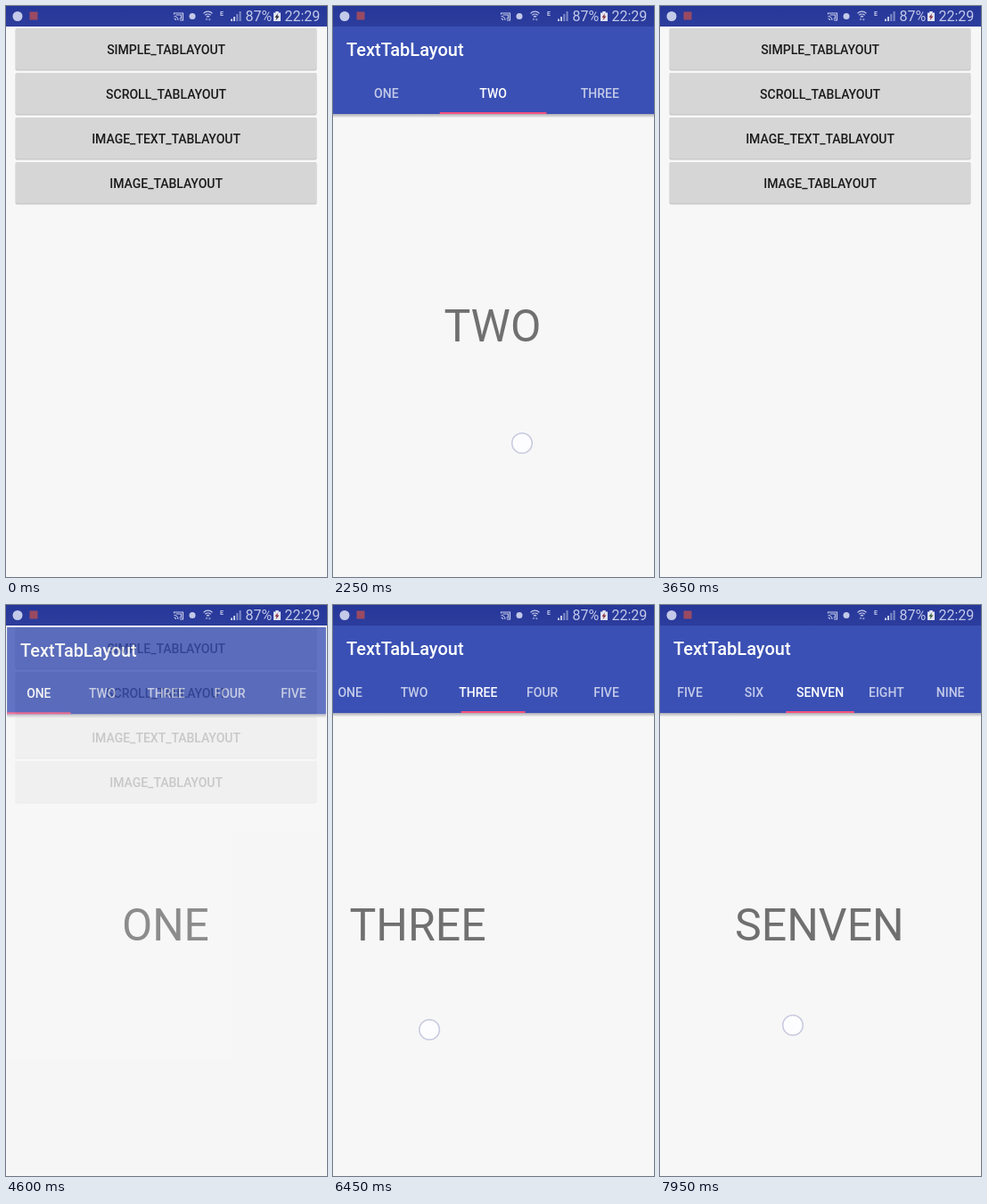
Animation, 360 px wide and 640 px high, one loop 8000 ms. Source, as an HTML page:

```html
<!DOCTYPE html>
<html lang="en">
<head>
<meta charset="utf-8">
<title>TextTabLayout</title>
<style>
  html, body { margin: 0; width: 100%; height: 100%; overflow: hidden; background: #f7f7f7; }
  svg { display: block; width: 360px; height: 640px; font-family: Roboto, "Noto Sans", sans-serif; }
  .btn, .tab { font-size: 14px; font-weight: 500; text-anchor: middle; }
  .btn { fill: #1a1a1a; }
  .tab { fill: #fff; fill-opacity: .7; }
  .tab.on { fill-opacity: 1; }
  .title { font-size: 20px; font-weight: 500; fill: #fff; }
  .page { font-size: 50px; fill: #707070; text-anchor: middle; }
  .clock { font-size: 16px; fill: #c3c9e8; }
</style>
</head>
<body>
<svg id="stage" viewBox="0 0 360 640">
  <defs>
    <linearGradient id="shade" x2="0" y2="1">
      <stop offset="0" stop-color="#445" stop-opacity=".42"/>
      <stop offset="1" stop-color="#445" stop-opacity="0"/>
    </linearGradient>
    <linearGradient id="bar" x2="0" y2="1">
      <stop offset="0" stop-color="#26379a"/>
      <stop offset="1" stop-color="#2c3d9d"/>
    </linearGradient>
  </defs>
  <rect width="360" height="640" fill="#f7f7f7"/>
  <g id="menu"></g>
  <g id="screens"></g>
  <g id="status">
    <rect width="360" height="23" fill="url(#bar)"/>
    <circle cx="13" cy="11.5" r="5.5" fill="#c3c9e8"/>
    <rect x="26.5" y="6.5" width="9" height="9" fill="#9a4a62"/>
    <g fill="none" stroke="#c3c9e8" stroke-width="1.2">
      <path d="M188.500 9.500V8h10v8h-3.500"/>
      <path d="M188.500 11.500a4.500 4.500 0 0 1 4.500 4.500M188.500 14a2 2 0 0 1 2 2M190.500 10h6v4h-2"/>
      <path d="M221.500 8.300a7 7 0 0 1 10 0M223.300 10.300a4.600 4.600 0 0 1 6.400 0M225 12.200a2.200 2.200 0 0 1 3 0"/>
    </g>
    <circle cx="209" cy="11.500" r="3.500" fill="#c3c9e8"/>
    <path d="M223.500 15.500l1.500-2 1.500 2zM226.800 14.500l1.500 2 1.500-2z" fill="#a4add9"/>
    <text x="242" y="11" font-size="7" font-weight="700" fill="#c3c9e8" text-anchor="middle">E</text>
    <path d="M252 17v-2.500h2V17zM255 17v-5h2v5z" fill="#c3c9e8"/>
    <path d="M258.300 17V9h2v8zM261.600 17V6h2v11z" fill="#7f8bc6"/>
    <text class="clock" x="268.500" y="17.200">87%</text>
    <path d="M300 7.500h2.300V6h3.400v1.500h2.300V17h-8z" fill="#e0e3f2"/>
    <path id="bolt" d="M305 8.500l-3.500 4.300h2l-.8 3.200 3.800-4.500h-2.200z"/>
    <text class="clock" x="312.500" y="17.200">22:29</text>
  </g>
  <circle id="touch" r="11.300" fill="#fdfdff" fill-opacity=".92" stroke="#c9cae0" stroke-width="1.500"/>
</svg>
<script>
const LOOP = 8000, STEP = 50, W = 359.2, MID = W / 2, PAGE = 360;
const TOP = 23, HEADER = 121;
const $ = id => document.getElementById(id);

function add(parent, tag, attrs, text) {
  const el = document.createElementNS("http://www.w3.org/2000/svg", tag);
  for (const k in attrs) el.setAttribute(k, attrs[k]);
  if (text) el.textContent = text;
  parent.appendChild(el);
  return el;
}

const presses = ["SIMPLE", "SCROLL", "IMAGE_TEXT", "IMAGE"].map((name, i) => {
  const y = 25 + i * 50, box = { x: 11, width: 337, height: 46, rx: 2 };
  add($("menu"), "rect", { ...box, x: 10.5, y, width: 338, height: 47.5, fill: "#000", "fill-opacity": .19 });
  add($("menu"), "rect", { ...box, y, fill: "#d6d6d6" });
  const press = add($("menu"), "rect", { ...box, y, fill: "#000", opacity: 0 });
  add($("menu"), "text", { class: "btn", x: MID, y: y + 29 }, name + "_TABLAYOUT");
  return press;
});

function makeScreen(names, widths) {
  const g = add($("screens"), "g", {});
  add(g, "rect", { y: TOP, width: 360, height: 640 - TOP, fill: "#f7f7f7" });
  const pages = names.map(n => add(g, "text", { class: "page", y: 376 }, n));
  add(g, "rect", { y: HEADER, width: 360, height: 4.5, fill: "url(#shade)" });
  add(g, "rect", { y: TOP, width: 360, height: HEADER - TOP, fill: "#3a50b4" });
  add(g, "text", { class: "title", x: 15, y: 56 }, "TextTabLayout");
  const strip = add(g, "g", {});
  let x = 0;
  const lefts = widths.map(w => (x += w) - w);
  const tabs = names.map((n, i) =>
    add(strip, "text", { class: "tab", x: lefts[i] + widths[i] / 2, y: 103 }, n));
  const line = add(strip, "rect", { y: HEADER - 2, height: 2, fill: "#f5517f" });
  return { g, pages, strip, tabs, line, lefts, widths, total: x };
}

const numbers = ["ONE", "TWO", "THREE", "FOUR", "FIVE", "SIX", "SENVEN", "EIGHT", "NINE"];
const screens = [
  makeScreen(numbers.slice(0, 3), Array(3).fill(W / 3)),
  makeScreen(numbers, numbers.map(n => n === "SENVEN" ? 76.6 : W / 5))
];

// When each screen opens and closes, and the tap before it
const visits = [
  { tap: 700, open: 800, close: 3400, x: 205, y: 50 },
  { tap: 4250, open: 4450, close: Infinity, x: 205, y: 99 }
];

// Finger down, start of the drag, place, screen and page
const swipes = [
  { down: 1150, drag: 1800, x: 222, y: 471, screen: 0, page: 0 },
  { down: 2250, drag: 2400, x: 212, y: 490, screen: 0, page: 1 },
  { down: 4800, drag: 5450, x: 214, y: 505, screen: 1, page: 0 },
  { down: 5850, drag: 5850, x: 205, y: 490, screen: 1, page: 1 },
  { down: 6300, drag: 6350, x: 200, y: 474, screen: 1, page: 2 },
  { down: 6750, drag: 6750, x: 205, y: 496, screen: 1, page: 3 },
  { down: 7150, drag: 7200, x: 204, y: 467, screen: 1, page: 4 },
  { down: 7550, drag: 7550, x: 202, y: 469, screen: 1, page: 5 },
  { down: 7950, drag: LOOP, x: 149, y: 471, screen: 1, page: 6 }
];
const LIFT = 150, SLOP = 8;
const dragged = [0, .03, .233, .48];

function travel(dt) {
  if (dt <= 0) return 0;
  if (dt >= 400) return 1;
  if (dt > LIFT) return 1 - .52 * (1 - (dt - LIFT) / 250) ** 3;
  const i = Math.floor(dt / STEP), u = dt / STEP - i;
  return dragged[i] + ((dragged[i + 1] ?? dragged[i]) - dragged[i]) * u;
}

function drawScreen(s, pos, selected) {
  const i = Math.min(Math.floor(pos), s.tabs.length - 1), j = Math.min(i + 1, s.tabs.length - 1);
  const mix = list => list[i] + (list[j] - list[i]) * (pos - i);
  const left = mix(s.lefts), width = mix(s.widths);
  const scroll = Math.max(0, Math.min(left + width / 2 - MID, s.total - W));
  s.strip.setAttribute("transform", `translate(${-scroll} 0)`);
  s.line.setAttribute("x", left);
  s.line.setAttribute("width", width);
  s.tabs.forEach((tab, k) => tab.classList.toggle("on", k === selected));
  s.pages.forEach((page, k) => page.setAttribute("x", MID - .7 + (k - pos) * PAGE));
}

function fade(g, v, t) {
  let alpha = 0, scale = 1;
  if (t >= v.close) {
    const u = Math.min(1, (t - v.close) / 250);
    alpha = 1 - u;
    scale = 1 - .08 * u * u;
  } else if (t > v.open) {
    const dt = t - v.open;
    alpha = Math.min(1, dt / 190);
    scale = 1 - .1 * Math.max(0, 1 - dt / 300) ** 4;
  }
  g.setAttribute("opacity", alpha);
  g.setAttribute("display", alpha > 0 ? "inline" : "none");
  g.setAttribute("transform", `translate(${MID} 320) scale(${scale}) translate(${-MID} -320)`);
}

function render(t) {
  let finger = null;
  const pos = [0, 0], selected = [0, 0];

  for (const s of swipes) {
    if (t < s.down) break;
    const dt = t - s.drag, p = travel(dt);
    pos[s.screen] = s.page + p;
    selected[s.screen] = s.page + (dt > LIFT ? 1 : 0);
    finger = dt > LIFT ? null : {
      x: s.x - SLOP * Math.max(0, Math.min(1, dt / STEP)) - p * PAGE,
      y: s.y + Math.max(0, dt) * .02
    };
  }

  visits.forEach((v, i) => {
    const dt = t - v.tap;
    const pressed = dt >= 0 && dt < 450;
    presses[i].setAttribute("opacity", pressed ? .1 * (1 - dt / 450) : 0);
    if (dt >= 0 && dt < 100) finger = v;
    drawScreen(screens[i], pos[i], selected[i]);
    fade(screens[i].g, v, t);
  });

  $("touch").setAttribute("display", finger ? "inline" : "none");
  if (finger) {
    $("touch").setAttribute("cx", finger.x);
    $("touch").setAttribute("cy", finger.y);
  }
  $("bolt").setAttribute("fill", t < 700 ? "#222" : t < 7250 ? "#8a2f3a" : "#3c5a34");
}

const start = performance.now();
function tick() {
  const t = (performance.now() - start) % LOOP;
  render(Math.floor(t / STEP) * STEP);
  requestAnimationFrame(tick);
}
tick();
</script>
</body>
</html>
```
